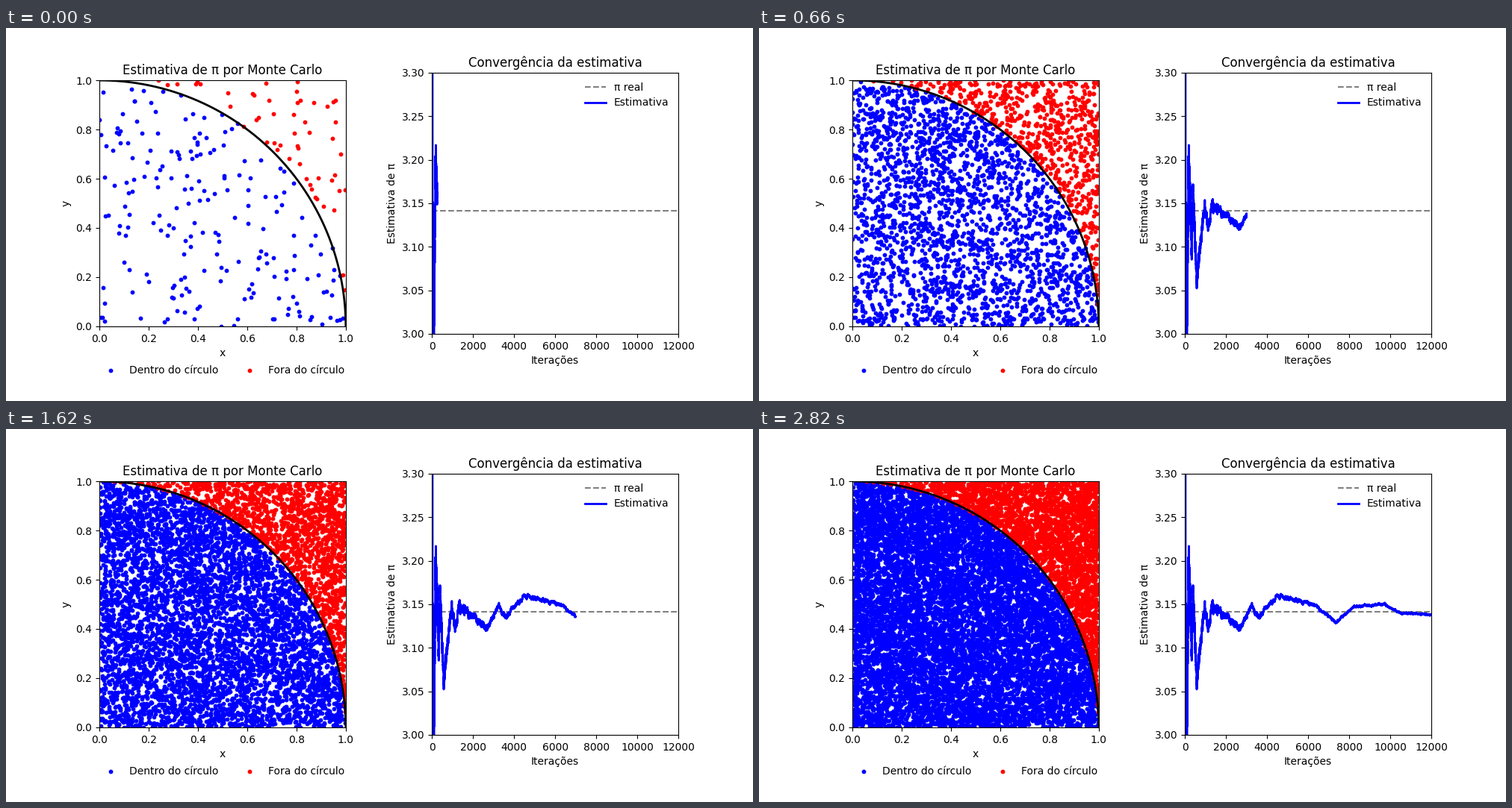
Animation of 1000x500 px, one loop 2.88 s. Source, as a matplotlib script:

```python
import numpy as np
import matplotlib.pyplot as plt
from matplotlib.animation import FuncAnimation

TOTAL = 12000
STEP = 250
FRAMES = TOTAL // STEP

# Main turns of the running estimate; seeded noise fills in the rest
TURN_AT = [1, 40, 180, 330, 390, 570, 950, 1140, 1310, 2000, 2700,
           3250, 3600, 4550, 6350, 7350, 8250, 9700, 10500, TOTAL]
TURN_TO = [4, 2.9, 3.205, 3.1, 3.17, 3.06, 3.147, 3.123, 3.147, 3.137, 3.123,
           3.149, 3.135, 3.16, 3.149, 3.129, 3.148, 3.15, 3.14, 3.138]

rng = np.random.default_rng(7)
steps = np.arange(1, TOTAL + 1)


def draw_hits():
    """Random hits whose running ratio is pulled towards the turns."""
    goal = np.append(0, steps * np.interp(steps, TURN_AT, TURN_TO) / 4)
    pull = np.clip(120 / steps, 0.04, 1)
    luck = rng.random(TOTAL)
    hits = np.zeros(TOTAL, bool)
    count = 0
    for i in range(TOTAL):
        chance = goal[i + 1] - goal[i] + pull[i] * (goal[i] - count)
        hits[i] = luck[i] < chance
        count += hits[i]
    return hits


def draw_points(hits):
    """Uniform points that fall inside the circle where hits is true."""
    pool = rng.random((2 * TOTAL, 2))
    inside = (pool ** 2).sum(axis=1) <= 1
    points = np.empty((TOTAL, 2))
    points[hits] = pool[inside][:hits.sum()]
    points[~hits] = pool[~inside][:(~hits).sum()]
    return points


hits = draw_hits()
points = draw_points(hits)
estimate = 4 * np.cumsum(hits) / steps

fig, (ax1, ax2) = plt.subplots(1, 2, figsize=(10, 5), dpi=100)
fig.subplots_adjust(left=0.125, right=0.9, bottom=0.18, top=0.88, wspace=0.35)

ax1.set(xlim=(0, 1), ylim=(0, 1), aspect="equal", xlabel="x", ylabel="y",
        title="Estimativa de π por Monte Carlo")
angle = np.linspace(0, np.pi / 2, 300)
ax1.plot(np.cos(angle), np.sin(angle), color="black", lw=2)
dots_in = ax1.scatter([], [], s=10, color="blue", label="Dentro do círculo")
dots_out = ax1.scatter([], [], s=10, color="red", label="Fora do círculo")
ax1.legend(loc="upper center", bbox_to_anchor=(0.5, -0.12), ncol=2,
           frameon=False)

ax2.set(xlim=(0, TOTAL), ylim=(3.0, 3.3), xlabel="Iterações",
        ylabel="Estimativa de π", title="Convergência da estimativa")
ax2.axhline(np.pi, color="gray", ls="--", lw=1.5, label="π real")
curve, = ax2.plot([], [], color="blue", lw=2, label="Estimativa")
ax2.legend(loc="upper right", frameon=False)


def update(frame):
    n = (frame + 1) * STEP
    shown, hit = points[:n], hits[:n]
    dots_in.set_offsets(shown[hit])
    dots_out.set_offsets(shown[~hit])
    curve.set_data(steps[:n], estimate[:n])
    return dots_in, dots_out, curve


anim = FuncAnimation(fig, update, frames=FRAMES, interval=60, repeat=True,
                     repeat_delay=0)
plt.show()
```
